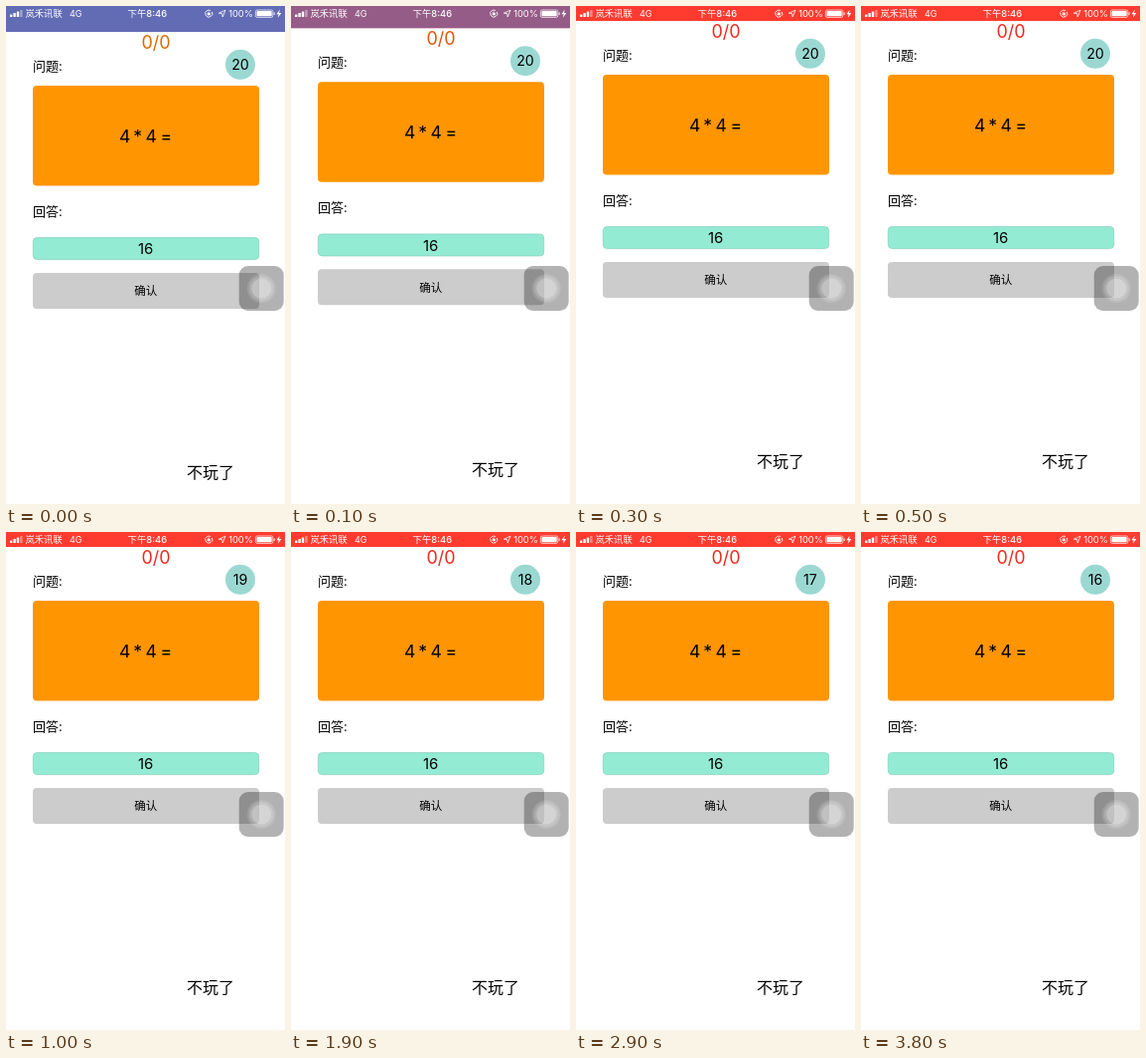
Recreate the animation shown at these times as an HTML page with a canvas. Size 281 px wide and 500 px high, loop 4000 ms.

```html
<!DOCTYPE html>
<html lang="zh-CN">
<head>
<meta charset="utf-8">
<title>口算练习</title>
<style>
html, body { margin: 0; width: 100%; height: 100%; overflow: hidden; background: #fff; }
canvas { display: block; width: 281px; height: 500px; }
</style>
</head>
<body>
<canvas id="stage"></canvas>
<script>
const W = 281, H = 500, LOOP = 4000;
const SLIDE = 300, STEP = 100, DROP = 11;
const TICKS = [1000, 1900, 2900, 3800];
const FONT = 'Inter, "Noto Sans CJK SC", "Noto Sans CJK", sans-serif';

const canvas = document.getElementById('stage');
const ctx = canvas.getContext('2d');
const dpr = window.devicePixelRatio || 1;
canvas.width = W * dpr;
canvas.height = H * dpr;

const mix = (a, b, p) => `rgb(${a.map((v, i) => Math.round(v + (b[i] - v) * p))})`;

function text(str, x, y, size, color = '#000', align = 'left', weight = 400) {
  ctx.font = `${weight} ${size}px ${FONT}`;
  ctx.textAlign = align;
  ctx.fillStyle = color;
  ctx.fillText(str, x, y);
}

function box(x, y, w, h, r, fill, stroke) {
  ctx.beginPath();
  ctx.roundRect(x, y, w, h, r);
  if (fill) { ctx.fillStyle = fill; ctx.fill(); }
  if (stroke) { ctx.strokeStyle = stroke; ctx.stroke(); }
}

function disc(x, y, r, fill) {
  ctx.beginPath();
  ctx.arc(x, y, r, 0, Math.PI * 2);
  ctx.fillStyle = fill;
  ctx.fill();
}

function poly(points, fill) {
  ctx.beginPath();
  points.forEach(([x, y]) => ctx.lineTo(x, y));
  ctx.closePath();
  if (fill) { ctx.fillStyle = fill; ctx.fill(); }
  else ctx.stroke();
}

function statusBar(p) {
  ctx.fillStyle = mix([98, 108, 180], [255, 59, 48], p);
  ctx.fillRect(0, 0, W, 15 + DROP * (1 - p));

  const ink = '#fff';
  for (let i = 0; i < 4; i++) {
    const h = 2.5 + i * 1.5;
    box(4 + i * 3.4, 11 - h, 2.4, h, 0.5, i < 3 ? ink : 'rgba(255,255,255,.4)');
  }
  text('岚禾讯联', 19.5, 11.2, 9.3, ink);
  text('4G', 64, 11, 9, ink);
  text('下午8:46', 142.3, 11.2, 9.4, ink, 'center', 500);

  // rotation lock
  ctx.strokeStyle = ink;
  ctx.lineWidth = 0.9;
  ctx.beginPath();
  ctx.arc(204.3, 7.6, 3.5, -0.5, 5.2);
  ctx.stroke();
  box(202.8, 7, 3, 2.3, 0.3, ink);
  ctx.lineWidth = 0.6;
  ctx.beginPath();
  ctx.arc(204.3, 7, 1, Math.PI, 0);
  ctx.stroke();

  // location arrow
  ctx.lineWidth = 0.8;
  poly([[221, 4.2], [218.2, 11], [217.7, 7.6], [214.3, 7.2]]);

  text('100%', 248.8, 11, 9.3, ink, 'right');
  ctx.lineWidth = 0.7;
  box(251.4, 4, 17.4, 7.4, 1.6, null, ink);
  box(252.5, 5.1, 15.2, 5.2, 0.8, ink);
  box(269.6, 6.3, 1, 2.8, 0.5, ink);
  poly([[275.8, 3.6], [272.4, 8.2], [274.6, 8.2], [273.8, 11.8], [277.4, 7], [275, 7]], ink);
}

function page(p, left) {
  text('0/0', 151, 31.6, 18, mix([222, 104, 4], [238, 42, 28], p), 'center');
  text('问题:', 27, 54, 13);
  disc(236, 47.8, 15, '#9bd8d2');
  text(left, 236, 53, 14.2, '#000', 'center');

  box(27, 69, 228, 100.5, 4, '#ff9500');
  [['4', 119.7], ['*', 132.7], ['4', 146.3], ['=', 161.3]]
    .forEach(([s, x]) => text(s, x, 126, 17.6, '#000', 'center'));

  text('回答:', 27, 199.5, 13);
  ctx.lineWidth = 0.7;
  box(27.3, 221.6, 227.4, 22, 4, '#94ebd3', '#83cdb9');
  text('16', 140.6, 238.2, 15, '#000', 'center');

  box(27, 257, 228, 36, 4, '#ccc');
  text('确认', 140.8, 279.4, 11.5, '#000', 'center');
  text('不玩了', 182, 463.2, 16);
}

function floatButton() {
  box(234.7, 261, 45, 45, 9, 'rgba(0,0,0,.3)');
  disc(257.2, 283.5, 14.6, 'rgba(255,255,255,.13)');
  disc(257.2, 283.5, 12.4, 'rgba(255,255,255,.16)');
  disc(257.2, 283.5, 10, 'rgba(255,255,255,.26)');
}

function draw(now) {
  const t = now % LOOP;
  const p = Math.min(1, Math.floor(t / STEP) * STEP / SLIDE);
  const left = 20 - TICKS.filter(k => t >= k).length;

  ctx.setTransform(dpr, 0, 0, dpr, 0, 0);
  ctx.fillStyle = '#fff';
  ctx.fillRect(0, 0, W, H);
  statusBar(p);
  ctx.save();
  ctx.translate(0, DROP * (1 - p));
  page(p, String(left));
  ctx.restore();
  floatButton();
}

let start;
function frame(now) {
  start ??= now;
  draw(now - start);
  requestAnimationFrame(frame);
}
draw(0);
requestAnimationFrame(frame);
</script>
</body>
</html>
```
